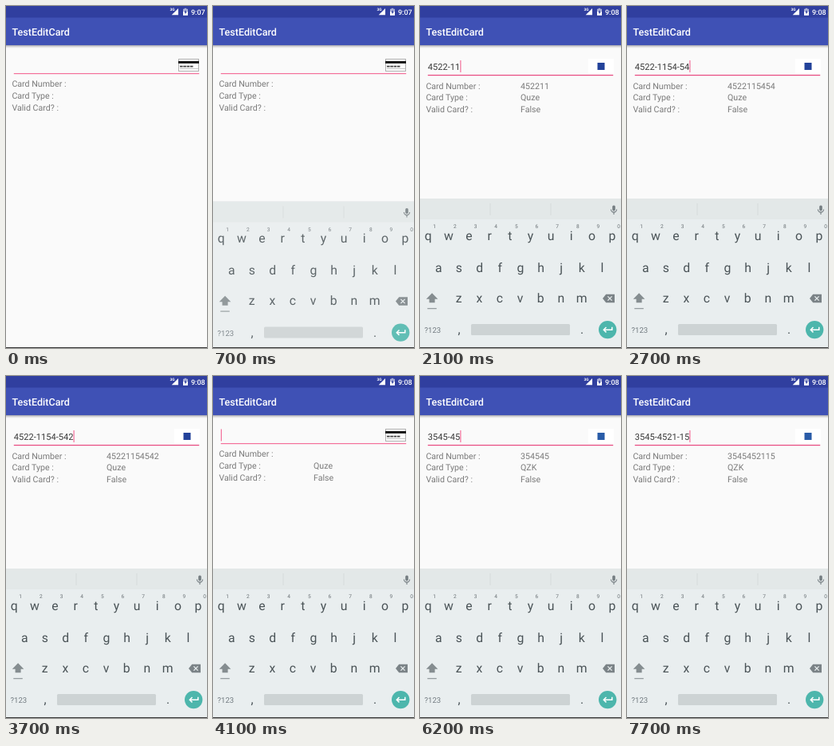
Write an HTML page that moves like this. It is 252 px wide and 428 px high and loops after 8 s.

```html
<!DOCTYPE html>
<html lang="en">
<head>
<meta charset="utf-8">
<title>TestEditCard</title>
<style>
html, body { margin: 0; width: 100%; height: 100%; overflow: hidden; background: #fafafa; }
svg { display: block; width: 100vw; height: 100vh; font-family: Roboto, "Noto Sans", sans-serif; }
text { white-space: pre; text-rendering: geometricPrecision; }
.labels { font-size: 10.65px; fill: #7a7a7a; }
.key { font-size: 15.8px; fill: #4a5357; text-anchor: middle; }
.hint { font-size: 6.6px; fill: #6a7175; text-anchor: middle; }
</style>
</head>
<body>
<svg viewBox="0 0 252 428">
  <defs>
    <linearGradient id="shade" x2="0" y2="1">
      <stop stop-color="#a2a2aa"/><stop offset=".5" stop-color="#dcdcde"/>
      <stop offset="1" stop-color="#fafafa"/>
    </linearGradient>
  </defs>
  <rect width="252" height="428" fill="#fafafa"/>
  <rect y="49" width="252" height="4" fill="url(#shade)"/>
  <rect width="252" height="49" fill="#3f51b5"/>
  <rect width="252" height="14.5" fill="#303f9f"/>
  <g fill="#fff">
    <text x="7.4" y="37" font-size="12.6" font-weight="500">TestEditCard</text>
    <text x="205.5" y="6.3" font-size="4.8" font-weight="700">3G</text>
    <path d="M216 3v8.3h-8.3z"/>
    <path d="M223.6 2.7h2.6v1h1.8v3.3h-6v-3.3h1.6z" opacity=".6"/>
    <path d="M222 7h6v4.8h-6z"/>
    <path d="M225.4 4.6l-2 3.6h1.3v2.4l2-3.6h-1.3z" fill="#303f9f"/>
    <text id="clock" x="231.9" y="10.8" font-size="9" font-weight="500"></text>
  </g>

  <g id="blank">
    <rect x="216.5" y="66.5" width="25" height="15" fill="#fff" stroke="#b0b0b0"/>
    <path d="M216 70.4h26" stroke="#151515" stroke-width="3"/>
    <path d="M218 75.7h17" stroke="#444" stroke-width="1.8" stroke-dasharray="3.6 .7"/>
    <path d="M218 78.4h23" stroke="#bbb" stroke-width=".9"/>
  </g>
  <g id="brand">
    <rect x="211" y="66" width="32" height="18.5" fill="#fff"/>
    <rect id="mark" x="222.5" y="71" width="9" height="9"/>
  </g>
  <rect id="line" x="9.8" width="232.4" height="1.2"/>
  <text id="input" x="9.8" font-size="11.1" fill="#3a3a3a"></text>
  <rect id="cursor" width="1.2" height="15" fill="#f4709b"/>

  <g id="labels" class="labels">
    <text x="7.4" y="101.4">Card Number :</text>
    <text x="7.4" y="116">Card Type :</text>
    <text x="7.4" y="130.6">Valid Card? :</text>
    <text id="number" x="126" y="101.4"></text>
    <text id="type" x="126" y="116"></text>
    <text id="valid" x="126" y="130.6"></text>
  </g>

  <g id="keyboard">
    <rect y="241" width="252" height="190" fill="#e9eeef"/>
    <rect y="241" width="252" height="26" fill="#e3e8e8"/>
    <path d="M88 247v15M164 247v15" stroke="#d5dadb"/>
    <rect x="241.2" y="249.5" width="3.6" height="7" rx="1.8" fill="#757e82"/>
    <path d="M239.4 254.5a3.6 3.6 0 0 0 7.2 0M243 258v3" fill="none" stroke="#757e82" stroke-width="1.1"/>
    <path d="M15.1 359.3l7.3 7.5h-3.8v4.5h-7v-4.5h-3.8z" fill="#858d90"/>
    <path d="M9.3 378.6h11.5" stroke="#949c9f" stroke-width="1.3"/>
    <path d="M229 366l4.2-5.3h10.8v10.6h-10.8z" fill="#7b8387"/>
    <path d="M235.4 363.4l5.2 5.2m0-5.2l-5.2 5.2" stroke="#e9eeef" stroke-width="1.3"/>
    <text x="5.5" y="409" font-size="9.6" fill="#727b80">?123</text>
    <rect x="64" y="398" width="124" height="14" rx="1.5" fill="#cdd3d4"/>
    <circle cx="235.2" cy="405.1" r="11.2" fill="#4db6ac"/>
    <path d="M240.8 401.8v3.4h-10.5m3.2-3.2l-3.2 3.2l3.2 3.2" fill="none" stroke="#fff" stroke-width="1.5"/>
  </g>
  <rect y="427" width="252" height="1" fill="#383838"/>
</svg>
<script>
const LOOP = 8000;
const BRAND_A = 'Quze', BRAND_B = 'QZK';
const FIRST = '452211545421', SECOND = '35454521152';
const $ = id => document.getElementById(id);

// [time, number of digits in the field]
const firstSteps = [[900, 1], [1100, 2], [1300, 3], [1500, 4], [1700, 5], [2000, 6], [2200, 7],
  [2400, 8], [2600, 9], [2700, 10], [2900, 11], [3000, 12],
  [3700, 11], [3800, 8], [3900, 5], [4000, 2], [4100, 0]];
const secondSteps = [[4800, 1], [5000, 2], [5300, 3], [5500, 4], [5700, 5], [6100, 6], [6600, 7],
  [6900, 8], [7100, 9], [7300, 10], [7500, 11], [7700, 10]];

function addKey(x, y, char, cls = 'key') {
  const el = document.createElementNS('http://www.w3.org/2000/svg', 'text');
  el.setAttribute('x', x);
  el.setAttribute('y', y);
  el.setAttribute('class', cls);
  el.textContent = char;
  $('keyboard').append(el);
}
const addRow = (chars, x, y, cls) =>
  [...chars].forEach((c, i) => addKey(x + 25.65 * i, y, c, cls));

addRow('qwertyuiop', 10.2, 292.6);
addRow('1234567890', 18.2, 278.3, 'hint');
addRow('asdfghjkl', 23.3, 332.7);
addRow('zxcvbnm', 48.7, 370.9);
addKey(49, 410.3, ',');
addKey(203, 410.3, '.');

function digitsAt(t) {
  const second = t >= 4800;
  let count = 0;
  for (const [start, n] of second ? secondSteps : firstSteps) if (t >= start) count = n;
  return (second ? SECOND : FIRST).slice(0, count);
}

function typeOf(digits, t) {
  if (t < 900) return '';
  if (t < 4800) return digits.length === 1 ? 'UNKNOWN' : BRAND_A;
  return digits.length < 3 ? 'UNKNOWN' : BRAND_B;
}

function setAttrs(id, attrs) {
  for (const name in attrs) $(id).setAttribute(name, attrs[name]);
}
const setText = (id, text) => {
  if ($(id).textContent !== text) $(id).textContent = text;
};
const show = (id, on) => setAttrs(id, { visibility: on ? 'visible' : 'hidden' });

function draw(t) {
  const digits = digitsAt(t);
  let shown = digits.replace(/\d{4}/g, '$&-');
  if (t >= 3200 && t < 4800) shown = shown.replace(/-$/, '');
  const isA = digits[0] === '4', branded = isA || digits.length > 1;

  setText('clock', t < 2100 ? '9:07' : '9:08');
  setText('input', shown);
  setText('number', digits);
  setText('type', typeOf(digits, t));
  setText('valid', t < 900 ? '' : 'False');

  // The brand picture is taller and pushes the form down.
  show('blank', !branded);
  show('brand', branded);
  setAttrs('mark', { fill: isA ? '#23429a' : '#2a5ca8' });
  setAttrs('line', { y: branded ? 86 : 84, fill: branded ? '#e8487f' : '#f4709b' });
  setAttrs('input', { y: branded ? 80 : 78.5 });
  setAttrs('labels', { transform: `translate(0 ${branded ? 2.3 : 0})` });

  show('cursor', t >= 300 && t < 700 || t >= 900 && !(t >= 4600 && t < 4800));
  const end = shown ? $('input').getComputedTextLength() : 0;
  setAttrs('cursor', { x: 9.8 + end, y: branded ? 68 : 66.5 });

  show('keyboard', t >= 700);
  const drop = t < 800 ? 3.5 : t < 900 ? 1 : 0;
  setAttrs('keyboard', { transform: `translate(0 ${drop})`, opacity: t < 800 ? 0.88 : 1 });
}

function tick() {
  draw(performance.now() % LOOP);
  requestAnimationFrame(tick);
}
tick();
</script>
</body>
</html>
```
